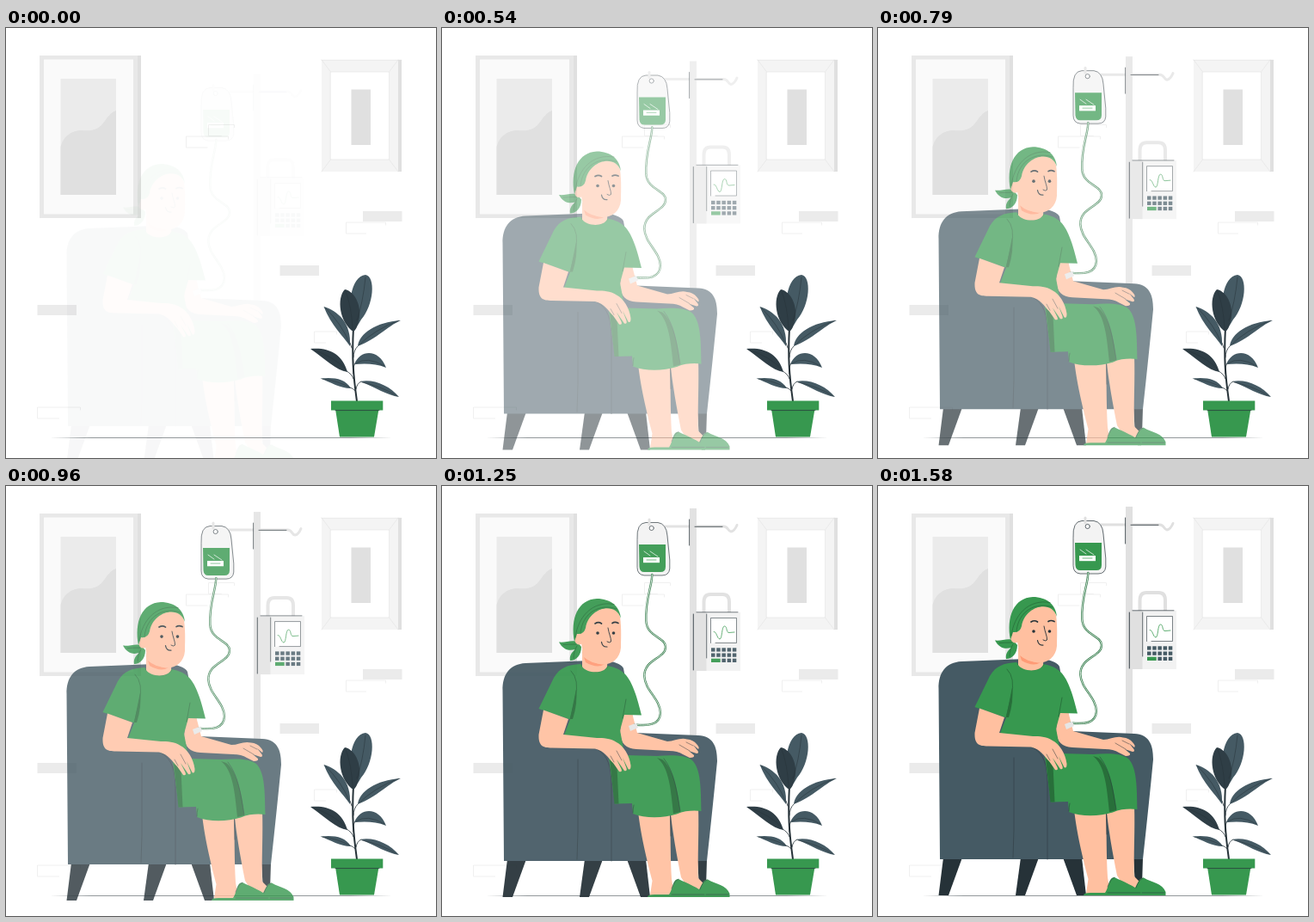
These frames come from a looping animation (500 px wide and 500 px high, 1.62 s). An HTML page with a canvas:

```html
<!DOCTYPE html>
<html lang="en">
<head>
<meta charset="utf-8">
<title>Patient in armchair</title>
<style>
html, body { margin: 0; width: 100%; height: 100%; overflow: hidden; background: #fff; }
canvas { display: block; width: 500px; height: 500px; }
</style>
</head>
<body>
<canvas id="stage" width="500" height="500"></canvas>
<script>
const SIZE = 500, LOOP = 1620, FPS = 24, RISE = 30;
const GREEN = '#37984f', DEEP = '#286f3a', SLATE = '#455a64', INK = '#263238';
const SKIN = '#ffc0a0', PALE = '#ebebeb', GREY = '#e0e0e0';

const stage = document.getElementById('stage').getContext('2d');
const makeLayer = () => {
  const canvas = document.createElement('canvas');
  canvas.width = canvas.height = SIZE;
  return canvas.getContext('2d');
};
const backdrop = makeLayer();
const scene = makeLayer();
let pen = backdrop;

function fill(color, path) {
  pen.fillStyle = color;
  pen.fill(new Path2D(path));
}
function line(color, width, path) {
  pen.strokeStyle = color;
  pen.lineWidth = width;
  pen.stroke(new Path2D(path));
}
function box(color, x, y, w, h) {
  pen.fillStyle = color;
  pen.fillRect(x, y, w, h);
}
function dot(color, x, y, rx, ry = rx) {
  pen.fillStyle = color;
  pen.beginPath();
  pen.ellipse(x, y, rx, ry, 0, 0, 7);
  pen.fill();
}

function drawWall() {
  box('#fff', 0, 0, SIZE, SIZE);
  // large picture
  box('#e8e8e8', 39, 32, 115, 189);
  box(GREY, 153, 32, 4, 189);
  box('#fafafa', 44, 36.5, 104, 180);
  box(PALE, 63.5, 59, 64.5, 135);
  fill(GREY, 'M63.5 194V138C67 125 77 119 88 119C108 121 112 112 117 105C121 100 124 97 128 96V194Z');
  // small picture
  box('#f4f4f4', 367, 37, 90, 130);
  box(GREY, 456, 37, 4, 130);
  box('#fff', 377.5, 51, 68, 102);
  line('#e6e6e6', .7, 'M377.5 51H445.5V153H377.5ZM367 37L377.5 51M456 37L445.5 51M367 167L377.5 153M456 167L445.5 153');
  line(GREY, .6, 'M367 37.3H460');
  box(GREY, 401.5, 71.5, 22.5, 64.5);
  // bricks
  for (const [x, y] of [[415, 213], [318.5, 276], [36.5, 322]]) box(PALE, x, y, 45.5, 12);
  for (const [x, y, w] of [[209.5, 126, 49], [235.5, 112.5, 30], [395.5, 226, 46], [358.5, 353, 26], [36.5, 441, 50]])
    line('#ececec', .8, `M${x + w} ${y + 3}v-3H${x}v13h${w * .5}`);
  fill(INK, 'M51 476.3L100 476H400L449 476.3L400 476.6H100Z');
}

function drawPlant() {
  line(INK, 2, 'M408 434C404 405 402 385 404 348');
  line(INK, .8, 'M404 383Q404 375 409 370M402 372L400 366M404 402Q403 394 406 390M404 408Q402 402 396 399M406 422Q404 419 400 418M407 420Q408 413 413 411');
  fill(SLATE, 'M402 352C397 325 400 289 418 287C430 289 428 322 413 339Q407 350 402 352Z');
  fill(SLATE, 'M369.5 324C386 329 402 343 400 370C392 358 378 346 369.5 324Z');
  fill(SLATE, 'M409 370C411 355 430 342 459 340C443 347 432 361 409 370Z');
  fill(SLATE, 'M405 391C412 373 434 373 442 395C430 390 418 390 405 391Z');
  fill(SLATE, 'M365.5 407.5C380 406 394 407 401 419C388 419 378 412 365.5 407.5Z');
  fill(SLATE, 'M412 411C428 408 446 416 457 429C443 427 430 418 412 411Z');
  fill('#2f3e46', 'M354 373C374 371 391 378 397 400C384 398 371 385 354 373Z');
  fill('#2f3e46', 'M404 353C388 343 384 314 394 304C406 306 416 326 409 345Q407 351 404 353Z');
  line(INK, .5, 'M403 350Q402 325 395 306M408 340Q415 320 418 290M399 366Q391 345 371 325M410 369Q428 351 457 340M396 398Q382 382 356 374M407 390Q420 381 440 393M400 418Q385 410 368 408M414 412Q435 416 455 428');
  fill(GREEN, 'M383 443H433.5L428 475.5H388Z');
  box(GREEN, 378, 433.5, 60.3, 11);
  line(INK, .7, 'M383 444.6H434');
}

function drawDrip() {
  box(GREY, 288, 24, 8, 275);
  line(GREY, 3, 'M241 45H327C333 44.5 332 50.5 336 51Q340 50.5 343 43.5');
  line(INK, .8, 'M287.6 37V67M294 45.3H326');
  // monitor
  line(GREY, 4, 'M304.5 146V133Q304.5 124 312 124H326.5Q334 124 334 133V146');
  box('#f2f2f2', 306, 145, 41, 68);
  box(GREY, 292, 145, 15.5, 68);
  line(INK, .9, 'M292.3 147V212');
  line(INK, .7, 'M296 144.8H344M307.7 147V198');
  box('#fff', 312.5, 151.5, 30, 29);
  line(INK, .6, 'M312.5 180.5V151.5H342.5V180.5H318');
  line(GREEN, .8, 'M316 167.5C319 166 320 176 323 176C326 176 325 161 328.5 161C332 161 330 169 334 168.5L340 168');
  for (let row = 0; row < 3; row++)
    for (let col = row === 2 ? 2 : 0; col < 5; col++)
      box(SLATE, 313 + col * 6.2, 186.3 + row * 6.2, 4.5, 4.3);
  box(GREEN, 313, 198.7, 10.7, 4.3);
  // bag
  fill('#f3f3f3', 'M227 55Q228 41 236 40H252Q262 42 263 56L265 94Q264 102 256 102H234Q227 101 227 94Z');
  line(INK, .7, 'M227 60Q226 41 237 40.5H251Q261 42 262 56L264.8 84V94Q264 102 256 102H235Q227 101 227 93Z');
  fill(GREEN, 'M229 66H260V92Q260 98 254 98H235Q230 98 229.5 92Z');
  box('#fff', 234, 81, 19, 6.2);
  line('#fff', .7, 'M235 74L242 79M242 74L251 80');
  line(GREEN, .7, 'M238 84H249');
  line(GREY, 3, 'M241 37V43');
  dot('#fff', 243.7, 47, 2.6);
  pen.strokeStyle = INK;
  pen.lineWidth = .7;
  pen.stroke();
}

function drawChair() {
  for (const leg of ['M76 432H98L82 476H70.5Z', 'M166 432H187L171 476H160Z', 'M215 432H237L242 476H231Z', 'M297 432H308L307 464H299Z'])
    fill(INK, leg);
  fill(SLATE, 'M72 434L70.5 236C70 217 79 205 97 204L185 200.5Q207 202 211 210L225 285L298 288C315 289 320 300 320 318Q315 370 308 434Z');
  line('#37474f', .9, 'M158 316V400L157 432M180 304C193 311 197 325 197 345V434');
}

function drawHead() {
  fill(SKIN, 'M163 188L193 195L192 208C188 217 168 216 163 208Z');
  fill('#ff9b76', 'M165 197Q175 206 190 204.5Q181 211 167 203Z');
  fill(GREEN, 'M158 180C152 176 144 180.5 136 179.5C140 187 146 190.5 155 188C150 192 148 196 149 201C156 201 162 195 162 185Z');
  line(DEEP, .8, 'M156 182Q147 182 141 182.5M157 184Q153 190 153 198');
  fill(SKIN, 'M160 168C162 132 202 131 207 150C209 165 208 178 208 186C207 199 197 206 186 205.5C174 204 165 196 163 187Z');
  dot(SKIN, 159.5, 176, 5.5, 6.5);
  fill(GREEN, 'M208 152C202 132 171 139 167 163Q165 171 157 170L154 179C149 152 158 130 180 129C196 129 207 138 208 152Z');
  line(DEEP, .8, 'M155 174C158 150 175 131 200 135.5M161 169C163 145 184 134 203 141');
  dot(INK, 181, 169, 1.8);
  dot(INK, 199.5, 169, 1.8);
  line(INK, 1.7, 'M178 158Q182 155.5 185.5 158M198 157.5Q201 155.5 205 157.5');
  line(INK, .9, 'M193 163C194 170 197 175 196.5 179Q195 181 192 179');
  line(INK, 1.2, 'M185.5 179.5Q186.5 185.5 192 185');
}

function drawBody() {
  // legs and slippers
  fill(SKIN, 'M228 376C231 405 240 440 244.5 457L242 474H270L267 455C265.5 430 266 405 265 376Z');
  fill(SKIN, 'M265.5 376L298 371C299 400 297 430 298 454L309 465L290 471L278 453C273 428 268 400 265.5 376Z');
  line(INK, .7, 'M265.6 381L266.2 405');
  fill(GREEN, 'M297 470C302 464 303 455 309 455.5C318 461 331 462 334.5 472V476H302Z');
  fill(GREEN, 'M239 476Q239 473 247 473H264C269 466 268 455 275 455C285 460 299 465 306 473V476Z');
  line(INK, .5, 'M267 473H305M307 473H333M267 466Q270 457 275 455M300 467Q303 458 308 456');
  // trousers
  fill(GREEN, 'M194 314L201 367.5L221 367L222 379C237 385 258 384 273 379.5C283 375 294 375 301.5 376C301 350 301 329 292 318C284 310 265 311 250 312L213 311Z');
  fill(DEEP, 'M195 316L200.5 367.5H205.5L203.5 325Z');
  fill(DEEP, 'M250 314C264 325 266 350 269 379L277 377C274 350 268 325 256 316Z');
  line(INK, .5, 'M222 378Q222 373 223 369M258 315C270 330 273 352 277 376');
  // shirt and far arm
  fill(SKIN, 'M209 262L207 285C208 298 214 303 226 304L264 306Q274 306 280 310L288 314Q294 314 293 311L287 306L296 309Q299 309 297.5 306L292 299L298 304Q300 302 296 298Q292 293 285 292.5C277 290 270 295 262 295L227 285L221 262Z');
  line(INK, .5, 'M276 299L288 306M284 296L292 300');
  fill(GREEN, 'M161 205C146 206 137 209 130 221L112.5 257L149 269.5L141 290L190 300L213 316L211 303L207 282L212 264L232 264.5C228 248 222 225 212 216C206 210 198 208 192 207Q186 219 163 207Z');
  fill(DEEP, 'M156 234L149 269L152 269Q158 250 156 234Z');
  line(DEEP, .9, 'M150 213Q160 223 155 245L149 269M210 268L214 246');
  line(DEEP, .7, 'M162 207Q181 221 193 208');
  // near arm
  fill(SKIN, 'M118 258.5L112.5 287C112 300 117 302.5 128 302.5L178 303.5C189 306 193 314 199 320L206 330Q210 331 208.5 327L203 316L212 329Q215.5 330 214.5 326L210 314L216.5 327Q219.5 329 219.5 323C218 311 211 300 203 296C195 291 188 291 180 291L141 287L147 269Z');
  line(INK, .5, 'M196 312L200 319M203 306L209 317');
}

function drawTube() {
  const tube = 'M244.3 101C244 116 236 130 237.3 155C238 173 260 174 260 185C260 199 235 199 235.3 219C236 236 253.5 245 254 262C253 276.5 240 277 224 275.5';
  line('#347b4b', 2.4, tube);
  line('#d5e6da', 1, tube);
  fill('#e6e6e6', 'M217 277L226 273.5L228 279L219 283Z');
}

// Inverts the x curve of cubic-bezier(0, 0, .58, 1) by bisection.
function easeOut(p) {
  if (p >= 1) return 1;
  let lo = 0, hi = 1;
  for (let i = 0; i < 24; i++) {
    const s = (lo + hi) / 2;
    if (3 * (1 - s) * s * s * .58 + s ** 3 < p) lo = s;
    else hi = s;
  }
  return 3 * (1 - lo) * lo * lo + lo ** 3;
}

function render(time) {
  const step = Math.min(38, Math.floor((time % LOOP + 4.9) * FPS / 1000));
  const shown = easeOut((step + .75) / 38.75);
  pen = scene;
  pen.setTransform(1, 0, 0, 1, 0, 0);
  pen.clearRect(0, 0, SIZE, SIZE);
  pen.translate(0, RISE * (1 - shown));
  drawDrip();
  drawChair();
  drawBody();
  drawHead();
  drawTube();
  stage.globalAlpha = 1;
  stage.drawImage(backdrop.canvas, 0, 0);
  stage.globalAlpha = shown;
  stage.drawImage(scene.canvas, 0, 0);
}

let start;
function tick(now) {
  start ??= now;
  render(now - start);
  requestAnimationFrame(tick);
}

scene.lineCap = backdrop.lineCap = 'round';
drawWall();
drawPlant();
render(0);
requestAnimationFrame(tick);
</script>
</body>
</html>
```
